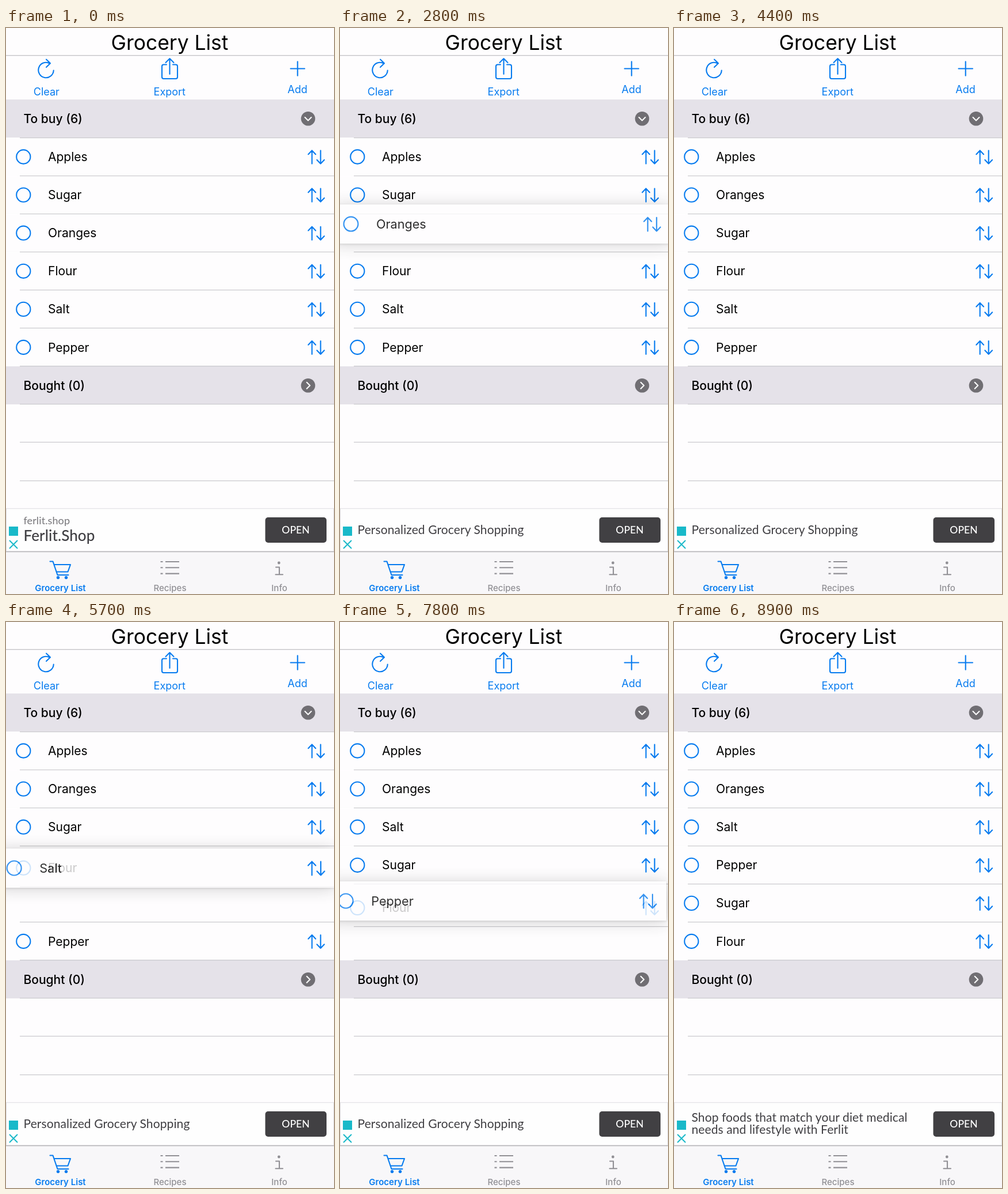
Animation, 570 px wide and 982 px high, one loop 9000 ms. Source, as an HTML page:

```html
<!DOCTYPE html>
<html lang="en">
<head>
<meta charset="utf-8">
<title>Grocery List</title>
<style>
html, body { margin: 0; width: 100%; height: 100%; overflow: hidden; background: #fefdfe; }
svg { display: block; width: 570px; height: 982px; font-family: Inter, Roboto, sans-serif; }
.stroke { fill: none; stroke: #067bef; stroke-width: 2.1; stroke-linecap: round; stroke-linejoin: round; }
.gray { stroke: #919095; }
.white { stroke: #fff; stroke-width: 2; }
.teal { stroke: #19b9c9; stroke-width: 2; }
.mid { text-anchor: middle; }
.blue { fill: #067bef; }
.item { font-size: 21px; }
.head { font-size: 21px; font-weight: 500; }
.tool { font-size: 18px; }
.tab { font-size: 15px; font-weight: 500; }
.ad { font-family: Lato, "Open Sans", sans-serif; letter-spacing: .1px; fill: #3f3e42; font-size: 21px; }
.site { font-size: 18px; fill: #77767a; }
.brand { font-size: 26px; font-weight: 500; }
.open { font-size: 17.5px; font-weight: 500; fill: #fff; }
.line { fill: #c9c8cc; }
</style>
</head>
<body>
<svg viewBox="0 0 570 982">
  <rect width="570" height="982" fill="#fefdfe"/>
  <text class="mid" x="284.5" y="37.5" font-size="35.4">Grocery List</text>
  <rect y="47" width="570" height="1.3" fill="#c3c2c5"/>

  <g class="stroke">
    <path d="M76 61.5A13.2 13.2 0 1 0 82.7 73.5M70 54.5L77 61.3L70 68"/>
    <path d="M279 63.5H274Q271 63.5 271 66.5V85Q271 88 274 88H295Q298 88 298 85V66.5Q298 63.5 295 63.5H290M284.5 80V54M277.5 60L284.5 53L291.5 60"/>
    <path d="M494.5 70.5H519M506.7 58.3V82.8"/>
  </g>
  <g class="tool mid blue">
    <text x="70.3" y="117">Clear</text>
    <text x="284.3" y="117">Export</text>
    <text x="506.5" y="112.5">Add</text>
  </g>

  <rect y="124" width="570" height="66" fill="#e5e2e9"/>
  <rect y="587" width="570" height="66" fill="#e5e2e9"/>
  <g id="lines"></g>
  <text class="head" x="30.5" y="165">To buy (6)</text>
  <text class="head" x="30.5" y="628">Bought (0)</text>
  <g fill="#706e73">
    <circle cx="525" cy="157.3" r="12.3"/>
    <circle cx="525" cy="620.2" r="12.3"/>
  </g>
  <path class="stroke white" d="M519.5 155L525 160.5L530.5 155M522.7 614.7L528.2 620.2L522.7 625.7"/>

  <g id="rows"></g>

  <rect x=".5" y="833.8" width="569" height="74" fill="#fefefe" stroke="#dddce0"/>
  <rect x="5" y="865" width="16" height="16" fill="#19b9c9"/>
  <path class="stroke teal" d="M6.5 889.5L19.5 902.5M19.5 889.5L6.5 902.5"/>
  <g id="ads" class="ad">
    <g>
      <text class="site" x="30.5" y="861">ferlit.shop</text>
      <text class="brand" x="30.5" y="890">Ferlit.Shop</text>
    </g>
    <text x="30.5" y="877.5">Personalized Grocery Shopping</text>
    <g>
      <text x="30.5" y="867">Shop foods that match your diet medical</text>
      <text x="30.5" y="888">needs and lifestyle with Ferlit</text>
    </g>
  </g>
  <rect x="450.5" y="849" width="106.5" height="44" rx="5" fill="#414043"/>
  <text class="ad open mid" x="503.5" y="876.5">OPEN</text>

  <rect y="908" width="570" height="74" fill="#f8f7f9"/>
  <rect y="908" width="570" height="1.3" fill="#b4b3b6"/>
  <path class="stroke" d="M76.5 925.5H81.5L89.5 949H108.5M83.3 931H112L107.5 943.5H87.5"/>
  <g class="blue"><circle cx="90.5" cy="953.5" r="2.7"/><circle cx="104.5" cy="953.5" r="2.7"/></g>
  <path class="stroke gray" style="stroke-linecap:butt" d="M268.5 926H272.5M268.5 936.3H272.5M268.5 946.6H272.5M277 926H301M277 936.3H301M277 946.6H301"/>
  <circle cx="474.3" cy="928" r="2.4" fill="#919095"/>
  <path class="stroke gray" d="M469 935.5H475V948.3M468.5 948.3H481"/>
  <g class="tab mid" fill="#919095">
    <text class="blue" x="94.5" y="977" style="font-weight:600">Grocery List</text>
    <text x="285" y="977">Recipes</text>
    <text x="475" y="977">Info</text>
  </g>
</svg>
<script>
const LOOP = 9000, STEP = 100, ROW = 66.1, TOP = 223.5, SWAP = 300;
const $ = id => document.getElementById(id);
const clamp = v => Math.max(0, Math.min(1, v));
const ease = (t, start, dur) => {
  const u = clamp((t - start) / dur);
  return u * u * (3 - 2 * u);
};
const slotY = slot => TOP + slot * ROW;

// Start slots, and [time, slot] moves made when another row passes.
const items = [
  { name: 'Apples', slot: 0, moves: [] },
  { name: 'Sugar', slot: 1, moves: [[3000, 2], [5990, 3], [8050, 4]] },
  { name: 'Oranges', slot: 2, moves: [] },
  { name: 'Flour', slot: 3, moves: [[5650, 4], [7735, 5]] },
  { name: 'Salt', slot: 4, moves: [] },
  { name: 'Pepper', slot: 5, moves: [] }
];

// Path points: time, centre y, sideways drift.
const drags = {
  Oranges: [[2700, slotY(2), 0], [3200, 277.5, -20], [3500, 280, -20], [3800, slotY(1), 0]],
  Salt: [[5300, slotY(4), 0], [5700, 427, -8], [6100, 353, -12], [6300, 351, -12], [6600, slotY(2), 0]],
  Pepper: [[7400, slotY(5), 0], [7800, 484, -12], [8150, 417, -14], [8400, 416, -14], [8700, slotY(3), 0]]
};

function along(path, t) {
  let i = 1;
  while (i < path.length - 1 && t > path[i][0]) i++;
  const [a, b] = [path[i - 1], path[i]];
  const u = clamp((t - a[0]) / (b[0] - a[0]));
  return [a[1] + (b[1] - a[1]) * u, a[2] + (b[2] - a[2]) * u];
}

for (let k = 0; k < 10; k++) {
  const y = Math.round(189.6 + k * ROW);
  $('lines').innerHTML += `<rect class="line" x="24" y="${y}" width="546" height="1.2"/>`;
}

for (const item of items) {
  const g = document.createElementNS('http://www.w3.org/2000/svg', 'g');
  g.innerHTML = `<rect width="570" fill="#fefdfe"/>
    <rect class="line" x="24" y="32" width="546" height="1.2"/>
    <circle class="stroke" cx="30.3" cy="0" r="12.1"/>
    <text class="item" x="73" y="7.5">${item.name}</text>
    <path class="stroke" d="M531.7 12V-11M525.3 -4.3L531.7 -11L538.1 -4.3M546.7 -11V12M540.3 5.3L546.7 12L553.1 5.3"/>`;
  item.row = g;
  [item.box, item.line] = g.children;
  $('rows').append(g);
}

function place(item, t) {
  const { row, box, line, moves } = item;
  let y = slotY(item.slot), dx = 0, lift = 0;
  for (const [start, slot] of moves) {
    y += (slotY(slot) - y) * ease(t, start, SWAP);
  }
  const path = drags[item.name];
  if (path) {
    [y, dx] = along(path, t);
    const first = path[0][0], last = path[path.length - 1][0];
    lift = ease(t, first - 100, 250) * (1 - ease(t, last - 250, 250));
  }
  const half = lift ? 33 : 32;
  box.setAttribute('y', -half);
  box.setAttribute('height', 2 * half);
  line.style.opacity = moves.some(([start]) => t > start && t < start + SWAP) ? 1 : 0;
  row.setAttribute('transform', `translate(${285 + dx} ${y}) scale(${1 + .032 * lift}) translate(-285 0)`);
  row.style.opacity = 1 - .2 * lift;
  row.style.filter = lift
    ? `drop-shadow(0 1px 2px rgba(0,0,0,${.16 * lift})) drop-shadow(0 2px 14px rgba(0,0,0,${.22 * lift}))`
    : 'none';
  if (lift && row.nextSibling) $('rows').append(row);
}

function draw(time) {
  const t = Math.floor(time % LOOP / STEP) * STEP;
  for (const item of items) place(item, t);
  const shown = t < 2800 ? 0 : t < 8500 ? 1 : 2;
  [...$('ads').children].forEach((ad, i) => ad.style.display = i === shown ? '' : 'none');
}

const begin = performance.now();
function tick() {
  draw(performance.now() - begin);
  requestAnimationFrame(tick);
}
tick();
</script>
</body>
</html>
```
